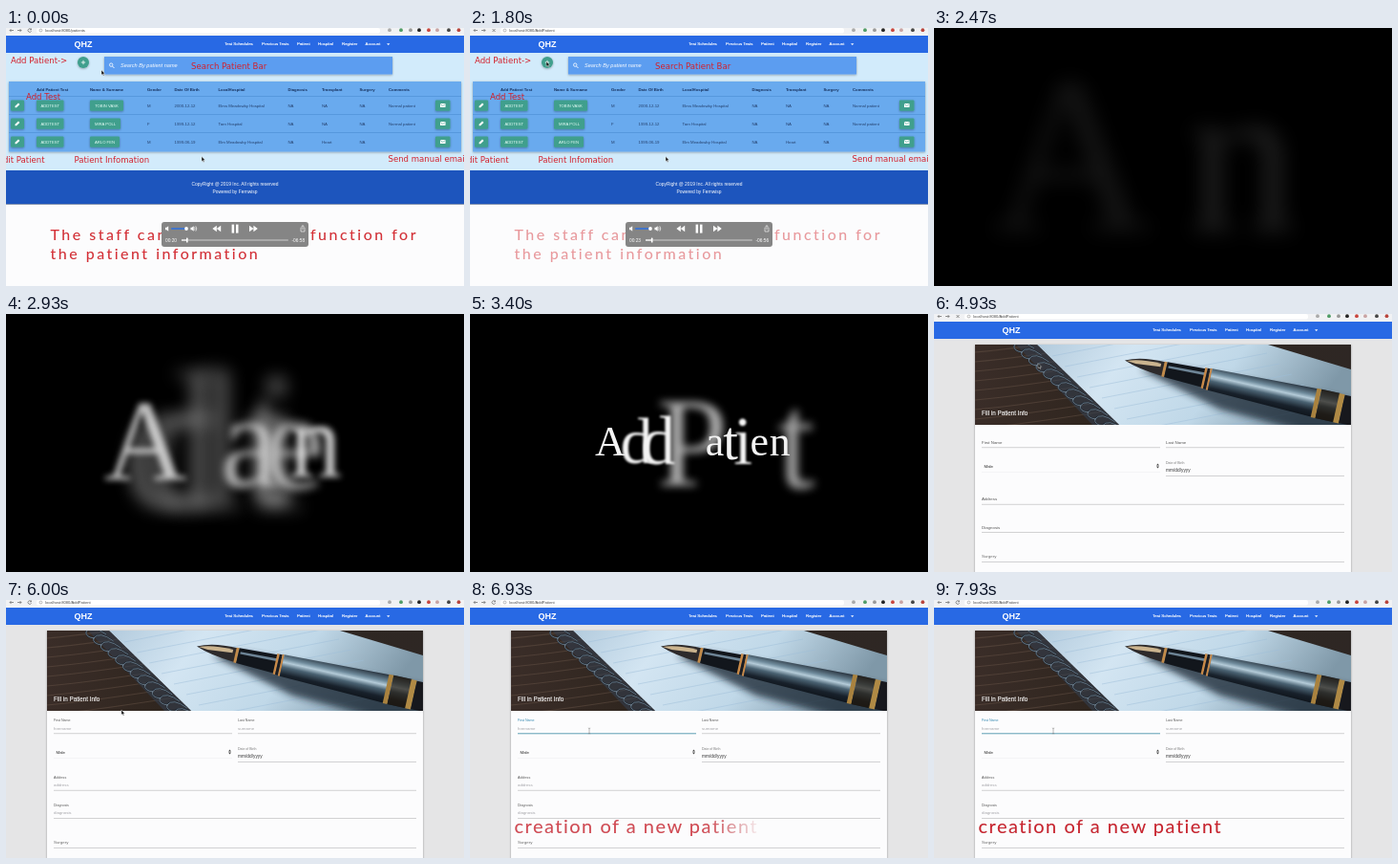
These frames come from a looping animation (480x270 px, 8000 ms). An HTML page:

```html
<!DOCTYPE html>
<html lang="en">
<head>
<meta charset="utf-8">
<title>Patient administration demo</title>
<style>
  html, body { margin: 0; width: 100%; height: 100%; overflow: hidden; background: #000; }
  svg { display: block; width: 100vw; height: 100vh; }
  text { font-family: "Liberation Sans", Arial, sans-serif; white-space: pre; }
  .note { font-family: "DejaVu Sans", Verdana, sans-serif; }
  .caption { font-family: Lato, "Open Sans", sans-serif; filter: drop-shadow(.7px .8px .7px rgba(60, 0, 0, .25)); }
  .title { font-family: "Liberation Serif", "Times New Roman", serif; }
</style>
</head>
<body>
<svg id="stage" viewBox="0 0 480 270"></svg>
<script>
const LOOP = 8000;
const TITLE_AT = 2130, FORM_AT = 4700;
const TITLE = "Add Patient";
// Moment at which each title letter starts to come into focus
const STARTS = [2417, 2700, 2714, 0, 2930, 2480, 2640, 2714, 2500, 2390, 2960];

const $ = id => document.getElementById(id);
const clamp = v => Math.max(0, Math.min(1, v));
const span = (t, a, b) => clamp((t - a) / (b - a));
const smooth = p => p * p * (3 - 2 * p);
const mix = (a, b, p) => a + (b - a) * p;

const text = (x, y, size, str, fill, attrs = "") =>
  `<text x="${x}" y="${y}" font-size="${size}" fill="${fill}" ${attrs}>${str}</text>`;
const rect = (x, y, w, h, fill, attrs = "") =>
  `<rect x="${x}" y="${y}" width="${w}" height="${h}" fill="${fill}" ${attrs}/>`;
const path = (d, fill, attrs = "") => `<path d="${d}" fill="${fill}" ${attrs}/>`;
const circle = (x, y, r, fill, attrs = "") =>
  `<circle cx="${x}" cy="${y}" r="${r}" fill="${fill}" ${attrs}/>`;
const note = (x, y, str) => text(x, y, 8.55, str, "#d3202b", 'class="note"');
const arrow = (id, x, y) =>
  `<g id="${id}" transform="translate(${x} ${y})">` +
  path("M0 0V5.2L1.2 4.1 2 6 2.9 5.6 2.1 3.8H3.7Z", "#111", 'stroke="#fff" stroke-width=".4"') + "</g>";

function browser() {
  const line = 'stroke="#666" stroke-width=".7"';
  const dots = ["#aaa", "#4f9c66", "#999", "#222", "#c8443c", "#c9a3a3", "#444", "#b8443c"];
  const xs = [402, 414, 424, 433, 443, 452, 464, 474.5];
  const links = [[229, "Test Schedules"], [268, "Previous Tests"], [305, "Patient"],
    [327, "Hospital"], [352, "Register"], [376.5, "Account"]];
  return rect(0, 0, 480, 9, "#f1f2f4") + rect(32, 0, 360, 5.5, "#fff", 'rx="2"') +
    path("M8 2.5H4M5.5 1 4 2.5 5.5 4M12 2.5H16M14.5 1 16 2.5 14.5 4", "none", line) +
    path("M23.5 1 26.5 4M26.5 1 23.5 4", "none", line + ' id="loading"') +
    path("M26.3 1.5A1.8 1.8 0 1 0 26.5 3.2M26.5 .5V1.8H25", "none", line + ' id="reload"') +
    circle(36.5, 2.5, 1.4, "none", 'stroke="#777" stroke-width=".5"') +
    text(41, 3.8, 4.1, "", "#444", 'id="url"') +
    xs.map((x, i) => circle(x, 2.2, 1.9, dots[i])).join("") +
    rect(0, 8, 480, 18, "#2869e4") +
    text(71.5, 20, 9, "QHZ", "#fff", 'font-weight="bold"') +
    links.map(([x, s]) => text(x, 18.3, 4.4, s, "#fff", 'stroke="#fff" stroke-width=".14"')).join("") +
    path("M399 16.2H402.4L400.7 18Z", "#fff");
}

function listPage() {
  const teal = "#3f9f8d", ink = "#243f6b";
  const cols = [[32, "Add Patient Test"], [88, "Name &amp; Surname"], [148, "Gender"],
    [176.5, "Date Of Birth"], [222.5, "LocalHospital"], [295.5, "Diagnosis"],
    [331, "Transplant"], [370.5, "Surgery"], [401, "Comments"]];
  const rows = [
    ["TOBIN VASK", "M", "2000-12-12", "Elms Meadowby Hospital", "NA", "NA", "NA", "Normal patient"],
    ["MIRA POLL", "F", "1999-12-12", "Tarn Hospital", "NA", "NA", "NA", "Normal patient"],
    ["ARLO FEN", "M", "1999-06-19", "Elm Meadowby Hospital", "NA", "Heart", "NA", ""]];
  const button = (x, y, w) => rect(x, y - 5.5, w, 11.2, teal, 'rx="1" filter="url(#soft)"');
  const label = (x, y, s) => text(x, y + 1.5, 4.2, s, "#e9fff9", 'text-anchor="middle"');

  const body = rows.map((row, i) => {
    const y = 81 + i * 19;
    const nameWidth = [35, 32, 31][i];
    return path(`M3 ${y - 9.5}H477`, "none", 'stroke="#4a8dd2" stroke-width=".6"') +
      button(5, y, 14) + path(`M9.5 ${y + 2.3}V${y + .8}L13 ${y - 2.4} 14.4 ${y - 1} 11 ${y + 2.3}Z`, "#fff") +
      button(32, y, 28.5) + label(46.3, y, "ADDTEST") +
      button(88, y, nameWidth) + label(88 + nameWidth / 2, y, row[0]) +
      row.slice(1).map((s, k) => text(cols[k + 2][0], y + 1.5, 4.3, s, ink)).join("") +
      button(450, y, 15.5) + rect(455, y - 2, 5.6, 4, "#fff", 'rx=".4"') +
      path(`M455.2 ${y - 1.4}L457.8 ${y + .4} 460.4 ${y - 1.4}`, "none", `stroke="${teal}" stroke-width=".6"`);
  }).join("");

  return rect(0, 26, 480, 124, "#d2ebfb") +
    rect(103, 30, 302, 18.5, "#5c9df0", 'filter="url(#soft)"') +
    circle(110.2, 38.6, 1.7, "none", 'stroke="#fff" stroke-width=".8"') +
    path("M111.5 40 113.5 42", "none", 'stroke="#fff" stroke-width=".9"') +
    text(120, 41, 5.6, "Search By patient name", "#fff", 'font-style="italic"') +
    circle(81, 36, 6, teal, 'filter="url(#soft)"') +
    path("M81 33.8V38.2M78.8 36H83.2", "none", 'stroke="#fff" stroke-width=".8"') +
    rect(3, 56, 474, 73.5, "#69aaee", 'filter="url(#soft)"') +
    cols.map(([x, s]) => text(x, 65.7, 4.25, s, "#16305c", 'font-weight="bold"')).join("") + body +
    rect(0, 149, 480, 35.5, "#1d55bd") + rect(0, 184.5, 480, 85.5, "#fcfcfd") +
    text(240, 165, 4.9, "CopyRight @ 2019 Inc. All rights reserved", "#fff", 'text-anchor="middle"') +
    text(240, 173.4, 4.9, "Powered by Fernwisp", "#fff", 'text-anchor="middle"') +
    note(5, 37, "Add Patient-&gt;") + note(194, 42.8, "Search Patient Bar") +
    note(21, 74.5, "Add Test") + note(-8.5, 140.8, "Edit Patient") +
    note(71.5, 140.8, "Patient Infomation") + note(400.5, 139.8, "Send manual email") +
    `<g id="intro">` +
    text(46.5, 222, 16, "The staff can use the search function for", "#d92f36", 'class="caption" letter-spacing="2.5"') +
    text(46.5, 242, 16, "the patient information", "#d92f36", 'class="caption" letter-spacing="2.5"') +
    "</g>" + player() + arrow("pointer", 100, 44) + arrow("rest", 205, 134.5);
}

function player() {
  const speaker = (x, waves) => path(`M${x} 208.8h1.4l1.8-1.6v5.6l-1.8-1.6h-1.4z`, "#fff") +
    (waves ? path(`M${x + 4} 208.4q1.2 1.6 0 3.2M${x + 5.3} 207.4q2 2.6 0 5.2`, "none", 'stroke="#fff" stroke-width=".7"') : "");
  return rect(163, 203, 154, 26, "#858585", 'rx="3"') +
    speaker(167, false) + speaker(193.5, true) +
    rect(173, 209.2, 17, 1.5, "#2d6fe0", 'rx=".7"') + circle(189, 210, 1.9, "#fff") +
    path("M220.8 206.8V213.2L216.4 210ZM225.2 206.8V213.2L220.8 210Z", "#fff") +
    rect(236.6, 205.6, 2.5, 9, "#fff") + rect(241, 205.6, 2.5, 9, "#fff") +
    path("M255 206.8V213.2L259.4 210ZM259.4 206.8V213.2L263.8 210Z", "#fff") +
    path("M309.6 208.8H309V213H313V208.8H312.4M311 211V206.6M309.8 207.8 311 206.6 312.2 207.8", "none", 'stroke="#fff" stroke-width=".6"') +
    text(167, 223.6, 4.8, "", "#fff", 'id="elapsed"') +
    rect(184, 221.3, 112, 1.5, "#b5b5b5", 'rx=".7"') + rect(184, 221.3, 6, 1.5, "#e8e8e8") +
    rect(189, 219.6, 1.6, 5, "#fff", 'rx=".6" id="knob"') +
    text(299.5, 223.6, 4.8, "", "#fff", 'id="remaining"');
}

function photo() {
  let grain = "", rules = "", rings = "";
  for (let i = 0; i < 9; i++) {
    grain += `M43 ${40 + i * 10}Q90 ${36 + i * 10} 190 ${20 + i * 10}`;
    rules += `M${124 + i * 13} ${44 + i * 11}L${310 + i * 13} ${8 + i * 11}`;
  }
  for (let i = 0; i < 13; i++) {
    const x = 84 + i * 7.7, y = 33 + i * 7;
    rings += `M${x + 21} ${y + 3}Q${x + 6} ${y - 8} ${x} ${y}Q${x - 1} ${y + 6} ${x + 9} ${y + 7}`;
  }
  return `<g clip-path="url(#photo)">` + rect(43, 32, 394, 84, "url(#wood)") +
    path(grain, "none", 'stroke="#6b5749" stroke-width="1.2" opacity=".45"') +
    path("M108 32H350L437 58V116H194Z", "url(#paper)") +
    path(rules, "none", 'stroke="#9dbdd8" stroke-width=".7" opacity=".7"') +
    path("M86 32H108L194 116H166Z", "#334152", 'opacity=".55"') +
    path(rings, "none", 'stroke="#1d2732" stroke-width="1.7"') +
    path(rings, "none", 'stroke="#a9bccd" stroke-width=".5"') +
    path("M216 58 300 100 437 136V90L250 55Z", "#15202e", 'opacity=".75" filter="url(#blurry)"') +
    `<g transform="translate(200 48.5) rotate(12.6)">` +
    path("M0 0Q16 -8 42 -7.5V7.5Q16 6 0 0Z", "#2d2a2b") +
    path("M2 0Q16 -5.5 38 -5V-1.5L12 1Z", "#cbb48f") +
    rect(41, -8, 3, 16, "#c08a4a") +
    path("M44 -8 86 -10V10L44 8Z", "#12161c") + path("M46 -4.5 86 -6V-3L46 -2Z", "#6d8496") +
    rect(84, -11, 2.5, 22, "#c98a48") + rect(86.5, -11, 3, 22, "#1b1d22") + rect(89.5, -11.5, 2, 23, "#c98a48") +
    path("M91.5 -11.5 204 -15V15L91.5 11.5Z", "url(#steel)") +
    rect(203, -15.5, 5, 31, "#a9823f") + rect(208, -15.5, 20, 31, "url(#steel)") +
    rect(208, -15.5, 20, 31, "#22190f", 'opacity=".7"') +
    rect(227, -15.5, 6, 31, "#b08a45") + rect(233, -15, 20, 30, "#17181d") +
    "</g></g>";
}

// Label rests on the line, then rises and uncovers the placeholder
const field = (x, y, w, label, hint) =>
  `<g class="label" data-x="${x}" data-y="${y}">` + text(0, 0, 4.4, label, "#555") + "</g>" +
  text(x, y - .5, 4.4, hint, "#a4a4a8", 'class="hint"') +
  rect(x, y + 3.6, w, .5, "#a5a5a8");

function formPage() {
  return rect(0, 26, 480, 244, "#e5e5e6") +
    rect(43, 32, 394, 250, "#fcfcfd", 'filter="url(#soft)"') + photo() +
    text(50, 106.3, 6.3, "Fill in Patient Info", "#fff", 'stroke="#fff" stroke-width=".1"') +
    field(50, 136, 187, "First Name", "forename") + field(243, 136, 187, "Last Name", "surname") +
    rect(50, 139.5, 187, .7, "#3f9ab8", 'id="focus"') +
    text(52.5, 160.6, 4.4, "Male", "#222") + rect(50, 165, 187, .3, "#e0e0e3") +
    path("M233 158.5 234.5 156.6 236 158.5ZM233 159.5 234.5 161.4 236 159.5Z", "#444") +
    text(243, 156.8, 3.5, "Date of Birth", "#777") + text(243, 164.6, 4.8, "mm/dd/yyyy", "#333") +
    rect(243, 169.5, 187, .5, "#a5a5a8") +
    field(50, 195.3, 380, "Address", "address") + field(50, 224.8, 380, "Diagnosis", "diagnosis") +
    text(50, 254.5, 4.4, "Surgery", "#666") + rect(50, 259, 380, .5, "#a5a5a8") +
    arrow("cursor", 109, 51.5) +
    path("M-1.2 -3Q0 -3 0 -2.2Q0 -3 1.2 -3M0 -2.2V2.2M-1.2 3Q0 3 0 2.2Q0 3 1.2 3", "none", 'id="beam" stroke="#777" stroke-width=".5"') +
    `<g id="outro">` +
    text(46.5, 243.5, 20, "creation of a new patient", "url(#reveal)", 'class="caption" letter-spacing="1.5"') + "</g>";
}

const stop = (at, color, attrs = "") => `<stop offset="${at}" stop-color="${color}" ${attrs}/>`;
$("stage").innerHTML = `<defs>
  <filter id="soft" x="-20%" y="-20%" width="140%" height="150%"><feDropShadow dx="0" dy=".7" stdDeviation=".8" flood-opacity=".35"/></filter>
  <filter id="blurry"><feGaussianBlur stdDeviation="3.5"/></filter>
  <clipPath id="photo"><rect x="43" y="32" width="394" height="84"/></clipPath>
  <linearGradient id="wood">${stop(0, "#3a2d28") + stop(.3, "#30261f") + stop(1, "#2e2724")}</linearGradient>
  <linearGradient id="paper" x2="1" y2=".2">${stop(0, "#b3cbdd") + stop(.3, "#d3e5f2") + stop(.65, "#c0d8e8") + stop(1, "#7f98a8")}</linearGradient>
  <linearGradient id="steel" x2="0" y2="1">${stop(0, "#27323d") + stop(.25, "#6f8b9c") + stop(.38, "#b4cbd8") + stop(.55, "#4a6272") + stop(.8, "#18212b") + stop(1, "#0f151c")}</linearGradient>
  <linearGradient id="reveal" gradientUnits="userSpaceOnUse" y1="0" y2="0">${stop(0, "#cb242f") + stop(1, "#cb242f", 'stop-opacity="0"')}</linearGradient>
</defs>
<g id="pages"><g id="list">${listPage()}</g><g id="form">${formPage()}</g>${browser()}</g>
<g id="title">${text(131, 148, 44, TITLE, "#f4f4f4", 'id="ruler" class="title" letter-spacing=".9" opacity="0"')}</g>`;

const show = (id, on) => { $(id).style.display = on ? "" : "none"; };
const place = (id, x, y) => $(id).setAttribute("transform", `translate(${x} ${y})`);

const letters = [...TITLE].map((ch, i) => {
  const ruler = $("ruler");
  const a = ruler.getStartPositionOfChar(i).x, b = ruler.getEndPositionOfChar(i).x;
  const g = document.createElementNS("http://www.w3.org/2000/svg", "g");
  g.innerHTML = text(a - (a + b) / 2, 15, 44, ch, "#f4f4f4", 'class="title"');
  $("title").append(g);
  return { g, glyph: g.firstChild, x: (a + b) / 2, start: STARTS[i] };
});
const labels = [...document.querySelectorAll(".label")];
const hints = [...document.querySelectorAll(".hint")];

function drawList(t) {
  const p = smooth(span(t, 70, 870));
  place("pointer", mix(100, 80, p), mix(44, 35, p));
  $("intro").style.opacity = 1 - span(t, 1500, 2080);
  const s = Math.floor(t / 600);
  $("elapsed").textContent = "00:" + (20 + s);
  $("remaining").textContent = "-06:" + (58 - Math.min(s, 2));
  $("knob").setAttribute("x", mix(189, 190, t / 2000));
}

function drawTitle(t) {
  const out = smooth(span(t, 4130, 4650));
  for (const { g, glyph, x, start } of letters) {
    const p = span(t, start, start + 900);
    const away = 1 - smooth(p);
    g.setAttribute("transform", `translate(${x} 133) scale(${1 + 4.4 * away})`);
    g.setAttribute("opacity", Math.min(1, p * 1.35) * (1 - out));
    const blur = 2 * Math.sqrt(away) + 3 * out;
    glyph.style.filter = blur > .02 ? `blur(${blur}px)` : "none";
  }
}

function drawForm(t) {
  const up = smooth(span(t, 5030, 5330));
  for (const el of labels)
    el.setAttribute("transform", `translate(${el.dataset.x} ${el.dataset.y - 8.8 * up}) scale(${mix(1, .82, up)})`);
  for (const el of hints) el.setAttribute("opacity", up);
  const go = smooth(span(t, 5600, 6200));
  const x = mix(109, 125, go), y = mix(51.5, 137, go);
  place("cursor", x, y);
  place("beam", x, y);
  show("cursor", y < 130);
  show("beam", y >= 130);
  $("focus").setAttribute("opacity", span(t, 6200, 6330));
  labels[0].firstChild.setAttribute("fill", t < 6200 ? "#555" : "#2f86b0");
  const edge = mix(15, 350, 1 - (1 - span(t, 6530, 7530)) ** 3);
  $("reveal").setAttribute("x1", edge - 32);
  $("reveal").setAttribute("x2", edge + 28);
  $("outro").style.opacity = mix(.65, 1, span(t, 6530, 7350));
  show("outro", t >= 6530);
}

function draw(t) {
  const list = t < TITLE_AT, form = t >= FORM_AT;
  show("pages", list || form);
  show("list", list);
  show("form", form);
  show("title", !list && !form);
  const loading = (t >= 1500 && list) || (form && t < 5050);
  show("loading", loading);
  show("reload", !loading);
  $("url").textContent = "localhost:8080/" + (t < 1500 ? "patients" : "AddPatient");
  if (list) drawList(t);
  else if (form) drawForm(t);
  else drawTitle(t);
}

const began = performance.now();
function tick() {
  draw((performance.now() - began) % LOOP);
  requestAnimationFrame(tick);
}
tick();
</script>
</body>
</html>
```
